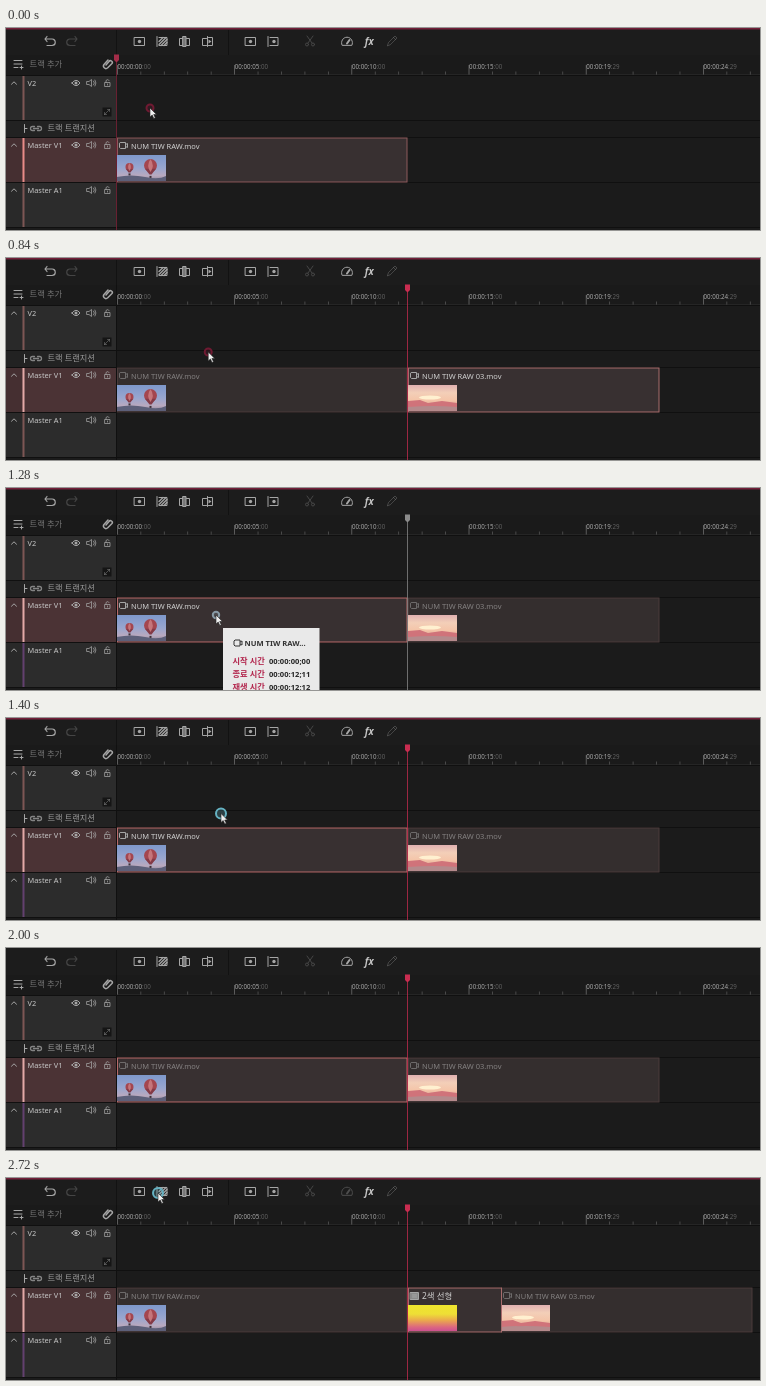
Write an HTML page that moves like this. It is 754 px wide and 202 px high and loops after 3270 ms.

```html
<!DOCTYPE html>
<html lang="ko">
<head>
<meta charset="utf-8">
<title>Timeline</title>
<style>
html, body { margin: 0; width: 100%; height: 100%; overflow: hidden; background: #1b1b1b; }
svg { display: block; width: 754px; height: 202px; font-family: "Noto Sans", "Noto Sans CJK KR", sans-serif; }
.ic { fill: none; stroke: #a6a6a6; stroke-width: 1; stroke-linecap: round; stroke-linejoin: round; }
.soft { opacity: .75; }
.dim { opacity: .3; }
</style>
</head>
<body>
<svg id="stage" viewBox="0 0 754 202" xmlns="http://www.w3.org/2000/svg"></svg>
<script>
const LOOP = 3270, STEP = 40;
const NAME = 'NUM TIW RAW';
const stage = document.getElementById('stage');

const rect = (x, y, w, h, fill, more = '') =>
  `<rect x="${x}" y="${y}" width="${w}" height="${h}" fill="${fill}" ${more}/>`;
const text = (x, y, size, fill, s, more = '') =>
  `<text x="${x}" y="${y}" font-size="${size}" fill="${fill}" ${more}>${s}</text>`;
const icon = (x, y, body, more = 'class="ic"') =>
  `<g transform="translate(${x} ${y})" ${more}>${body}</g>`;
const path = (d, more = '') => `<path d="${d}" ${more}/>`;
const circle = (x, y, r, more = '') => `<circle cx="${x}" cy="${y}" r="${r}" ${more}/>`;
const SOLID = 'fill="#a6a6a6" stroke="none"';

const camera = path('M-3-3H2V3H-3L-4 2V-2ZM2-1L4-2V2L2 1');

function toolbar() {
  const frame = path('M-5-4H5V4H-5Z');
  const bracket = path('M-5-5V5M-3-4H5V4H-3');
  const dot = circle(0, 0, 1.700, SOLID);
  const hatch = bracket + path('M-3 0L1-4M-3 3L4-4M-1 4L5-2M2 4L5 1', 'stroke-width="1.300"');
  const split = path('M-2-3H-5V4H-2M2-3H5V4H2') + path('M-1.500-5H1.500V5H-1.500Z', 'fill="#777"');
  const over = path('M-1-3H-5V4H-1M0-5V5M1-4H5V4H1') + path('M1-2L4 0L1 2Z', SOLID);
  return rect(0, 0, 754, 27, '#1c1c1c') +
    rect(110, 2, 1, 25, '#121212') + rect(222, 2, 1, 25, '#121212') +
    icon(44, 13, path('M-3-4.500L-5-2L-3 .5M-5-2H2A3 3 0 0 1 2 4.500H-3', 'stroke-width="1.200"')) +
    icon(66, 13, path('M3-4.500L5-2L3 .5M5-2H-2A3 3 0 0 0-2 4.500H3', 'stroke-width="1.200"'), 'class="ic dim"') +
    icon(133.500, 13.500, frame + dot) +
    icon(156, 13.500, hatch) +
    icon(178.500, 13.500, split) +
    icon(201.500, 13.500, over) +
    icon(244.500, 13.500, frame + dot) +
    icon(267, 13.500, bracket + circle(1, 0, 1.700, SOLID)) +
    icon(304, 13, path('M-3-5L2 2M3-5L-2 2') +
      circle(-3, 3.500, 1.500) + circle(3, 3.500, 1.500), 'class="ic dim"') +
    icon(341, 13.500, path('M-5 3.500A5.500 5.500 0 1 1 5 3.500Z') +
      path('M0 2L2.500-1.500', 'stroke-width="2"'), 'class="ic" id="gauge"') +
    text(358.800, 16.500, 9.800, '#c4c4c4', 'fx', 'font-style="italic" font-weight="700"') +
    icon(386, 13, path('M-4.500 4.500L-3.500 1.500L3-5L5-3L-1.500 3.500ZM1.500-3.500L3.500-1.500'), 'class="ic dim"');
}

function ruler() {
  let s = rect(0, 27, 754, 20, '#1a1a1a');
  ['00:00', '05:00', '10:00', '15:00', '19:29', '24:29'].forEach((t, i) => {
    const x = 111 + i * 117.200;
    s += rect(x, 37, 0.800, 10, '#6c6c6c');
    s += text(x + 0.500, 40.900, 6.200, '#a8a8a8',
      `00:00:${t.slice(0, 2)}<tspan fill="#606060">${t.slice(2)}</tspan>`);
    for (let k = 1; k < 5; k++) s += rect(x + k * 23.440, 43.500, 0.800, 3.500, '#555');
  });
  return s + rect(111, 46.500, 643, 0.800, '#303030') +
    icon(12, 36, path('M-4-3.500H4M-4 0H4M-4 3.500H0M3.500 2V5M2 3.500H5')) +
    text(23.500, 38.800, 8.300, '#747474', '트랙 추가') +
    icon(102, 36, path('M-2 1L1-2.500A1.700 1.700 0 0 1 4-.5L-.5 4A2.500 2.500 0 0 1-4 .5L0-4', 'stroke-width="1.500"'));
}

function header(y, name, eye, bg, bar, id) {
  const my = y + 8;
  return rect(0, y, 110, 45, bg) + rect(0, y, 16, 45, '#000', 'opacity=".08"') +
    rect(16.500, y, 2, 45, bar, `id="${id}"`) +
    icon(8, my - 0.500, path('M-2.500 1.200L0-1.200L2.500 1.200')) +
    text(21.500, my + 2.600, 7.400, '#c8c8c8', name) +
    (eye ? icon(70, my - 0.500, path('M-4 0Q0-5.500 4 0Q0 5.500-4 0Z') + circle(0, 0, 1.500, SOLID)) : '') +
    icon(85, my - 0.500, path('M-4-1.500H-2L.5-3.500V3.500L-2 1.500H-4ZM2.500-2Q4.500 0 2.500 2M4-3Q6 0 4 3'), 'class="ic soft"') +
    icon(101.500, my - 0.500, path('M-2.500-.5H2.500V3.500H-2.500ZM-1.500-.5V-2A1.600 1.600 0 0 1 1.500-2.500M0 1V2'), 'class="ic soft"');
}

function tracks() {
  return rect(0, 47, 754, 155, '#1b1b1b') +
    header(47.500, 'V2', true, '#2c2c2c', '#7d5654', 'barTop') +
    icon(101, 84, rect(-4.500, -4.500, 9, 9, '#151515', 'stroke="none"') +
      path('M-2.500 2.500L2.500-2.500M.5-2.500H2.500V-.5M-2.500.5V2.500H-.5', 'opacity=".4"')) +
    rect(0, 92.500, 110, 16.500, '#222') +
    icon(18.500, 100.500, path('M0-4V4M0 0H2.500')) +
    icon(30, 100.500, path('M-1.500-2H-3.500A2 2 0 0 0-3.500 2H-1.500M1.500-2H3.500A2 2 0 0 1 3.500 2H1.500M-2.500 0H2.500', 'stroke-width="1.300"'), 'class="ic soft"') +
    text(41.500, 103.300, 8.200, '#9a9a9a', '트랙 트랜지션') +
    header(109.500, 'Master V1', true, '#4b3335', '#e88b88', 'barMain') +
    header(154.500, 'Master A1', false, '#2c2c2c', '#7d5654', 'barSound') +
    [47, 92, 109, 154, 199].map(y => rect(0, y, 754, 1, '#101010')).join('') +
    rect(110, 27, 1, 175, '#101010');
}

const balloon = (x, y, r) =>
  circle(x, y, r, 'fill="#a4464f"') +
  path(`M${x - r * .85} ${y + r * .5}L${x - 1} ${y + r * 1.400}H${x + 1}L${x + r * .85} ${y + r * .5}Z`, 'fill="#843a47"') +
  path(`M${x} ${y - r}Q${x - r * .7} ${y} ${x} ${y + r}Q${x + r * .7} ${y} ${x} ${y - r}`, 'fill="#c5757a"') +
  rect(x - 1, y + r * 1.600, 2, 2, '#3e3038');

const thumbs = {
  balloons: rect(0, 0, 49, 26, 'url(#sky)') +
    path('M0 22Q14 19 28 22T49 21V26H0Z', 'fill="#5d607a"') +
    balloon(33.500, 10.500, 6.500) + balloon(12.500, 12, 4),
  sunset: rect(0, 0, 49, 26, 'url(#dusk)') +
    '<ellipse cx="22" cy="12.500" rx="11" ry="2" fill="#fff0d0"/>' +
    path('M0 16L12 15L20 18L34 16L49 18V23H0Z', 'fill="#d0737a"') +
    path('M0 22Q25 20 49 22V26H0Z', 'fill="#b58a8c"'),
  colors: rect(0, 0, 49, 26, 'url(#duo)')
};

const clip = (id, w, label, thumb) => `<g id="${id}">` +
  rect(0.500, 110, w - 1, 44, '#352e2e', 'stroke="#4a3b3b" class="body"') +
  '<g class="label">' +
  (thumb === 'colors'
    ? icon(6.500, 118, rect(-4, -3.500, 8, 7, '#8a8a8a') + path('M-2-1H2M-2 1H2'))
    : icon(6.500, 117.500, camera)) +
  text(14, 120.700, thumb === 'colors' ? 8.400 : 7.500, '#d0d0d0', label) + '</g>' +
  icon(0, 127, thumbs[thumb], '') + '</g>';

function tip() {
  const rows = [['시작', '00:00:00;00'], ['종료', '00:00:12;11'], ['재생', '00:00:12;12']];
  return '<g id="tip">' + rect(0, 0, 96.500, 72, '#e9e9e9') +
    icon(15, 15, camera, 'fill="none" stroke="#333"') +
    text(21.500, 17.700, 7.600, '#333', NAME + '...', 'font-weight="600"') +
    rows.map(([k, v], i) => {
      const y = 36 + i * 13;
      return text(9.500, y, 8.200, '#b3284f', k + ' 시간', 'font-weight="600"') +
        text(46, y, 7.600, '#252525', v, 'font-weight="600"');
    }).join('') + '</g>';
}

const gradient = (id, stops) => `<linearGradient id="${id}" x1="0" y1="0" x2="0" y2="1">` +
  stops.map(([o, c]) => `<stop offset="${o}" stop-color="${c}"/>`).join('') + '</linearGradient>';

stage.innerHTML = '<defs>' +
  gradient('sky', [[0, '#7e98cb'], [.5, '#98a6cf'], [.8, '#b9a9bf'], [1, '#8a8298']]) +
  gradient('dusk', [[0, '#e0b0b0'], [.3, '#f3cfb8'], [.6, '#f4c4a8'], [1, '#c98a88']]) +
  gradient('duo', [[0, '#efe52d'], [.35, '#eede36'], [.6, '#eaa64e'], [.85, '#dc6680'], [1, '#cc5090']]) +
  '</defs>' + toolbar() + ruler() + tracks() +
  clip('first', 290.500, NAME + '.mov', 'balloons') +
  clip('second', 251.500, NAME + ' 03.mov', 'sunset') +
  clip('added', 94, '2색 선형', 'colors') +
  rect(0, 0, 754, 1.500, '#75203a', 'id="focus"') +
  '<g id="head">' + rect(0, 33, 1, 169, 'currentColor', 'id="line"') +
  path('M-2 26.500H3V32L.5 34.500L-2 32Z', 'fill="currentColor"') + '</g>' +
  tip() +
  '<g id="mouse"><circle id="ring" fill-opacity=".25" stroke-width="2"/>' +
  path('M0 0V9L2.200 7L3.800 10.500L5.300 9.800L3.700 6.500H6.500Z', 'fill="#eee" stroke="#222" stroke-width=".6"') + '</g>';

const $ = id => document.getElementById(id);
const set = (el, props) => { for (const k in props) el.setAttribute(k, props[k]); };
const show = (id, on) => set($(id), { display: on ? 'inline' : 'none' });
const move = (id, x, y = 0) => set($(id), { transform: `translate(${x} ${y})` });

// [time, x, y]
const mousePath = [[40, 144, 80], [440, 155, 17], [640, 155, 17], [1000, 236, 149], [1080, 236, 149],
  [1240, 210, 127], [1320, 210, 127], [1480, 220, 64], [1720, 250, -20], [2360, 205, -20], [2640, 152, 15]];
const tipPath = [[1080, 246, 164], [1240, 217, 140]];

function along(keys, t) {
  const i = keys.findIndex(k => k[0] > t);
  if (i === 0) return keys[0].slice(1);
  if (i < 0) return keys[keys.length - 1].slice(1);
  const [a, b] = [keys[i - 1], keys[i]];
  const u = (t - a[0]) / (b[0] - a[0]), e = u * u * (3 - 2 * u);
  return [a[1] + (b[1] - a[1]) * e, a[2] + (b[2] - a[2]) * e];
}

function paintClip(id, selected, lit, edge) {
  set($(id).querySelector('.body'), { stroke: selected ? edge : '#4a3b3b', fill: selected ? '#383031' : '#342e2e' });
  set($(id).querySelector('.label'), { opacity: lit ? 1 : .5 });
}

function draw(t) {
  const inserted = t >= 680, picked = t >= 1160, added = t >= 2680;
  const pressed = t >= 1200 && t < 1360;
  const focused = t < 1800 || t >= 2440;
  const [mx, my] = along(mousePath, t);

  show('second', inserted);
  show('added', added);
  move('first', 111);
  move('second', added ? 495 : 402);
  move('added', 402);
  const hover = my > 110 && my < 154 && mx < 402;
  const firstOn = !inserted || (picked && !added);
  paintClip('first', firstOn, (firstOn && focused) || hover, picked ? '#b86a6a' : '#8d5a5c');
  paintClip('second', inserted && !picked, !picked, '#a86c6c');
  paintClip('added', added, true, '#a86c6c');

  show('focus', focused);
  set($('gauge'), { opacity: added ? .35 : 1 });
  set($('barSound'), { fill: picked ? '#63406f' : '#7d5654' });
  set($('barMain'), { fill: inserted ? '#e3a9a7' : '#e88b88' });

  move('head', inserted ? 401 : 110);
  set($('head'), { color: pressed ? '#8b8b8b' : inserted ? '#c92c50' : '#a32c48' });
  set($('line'), { opacity: inserted ? .75 : .6 });

  show('tip', t >= 1000 && t < 1400);
  move('tip', ...along(tipPath, t));

  move('mouse', mx, my);
  const tint = pressed ? '#8799a5' : picked ? '#65b2c2' : '#701a32';
  set($('ring'), { r: pressed ? 3.200 : picked ? 5 : 3.500, stroke: tint, fill: tint,
    opacity: !picked && t >= 440 && t < 680 ? .5 : 1 });
}

let start;
function tick(now) {
  start ??= now;
  const t = (now - start) % LOOP;
  draw(Math.min(2720, Math.floor(t / STEP) * STEP));
  requestAnimationFrame(tick);
}
draw(0);
requestAnimationFrame(tick);
</script>
</body>
</html>
```
